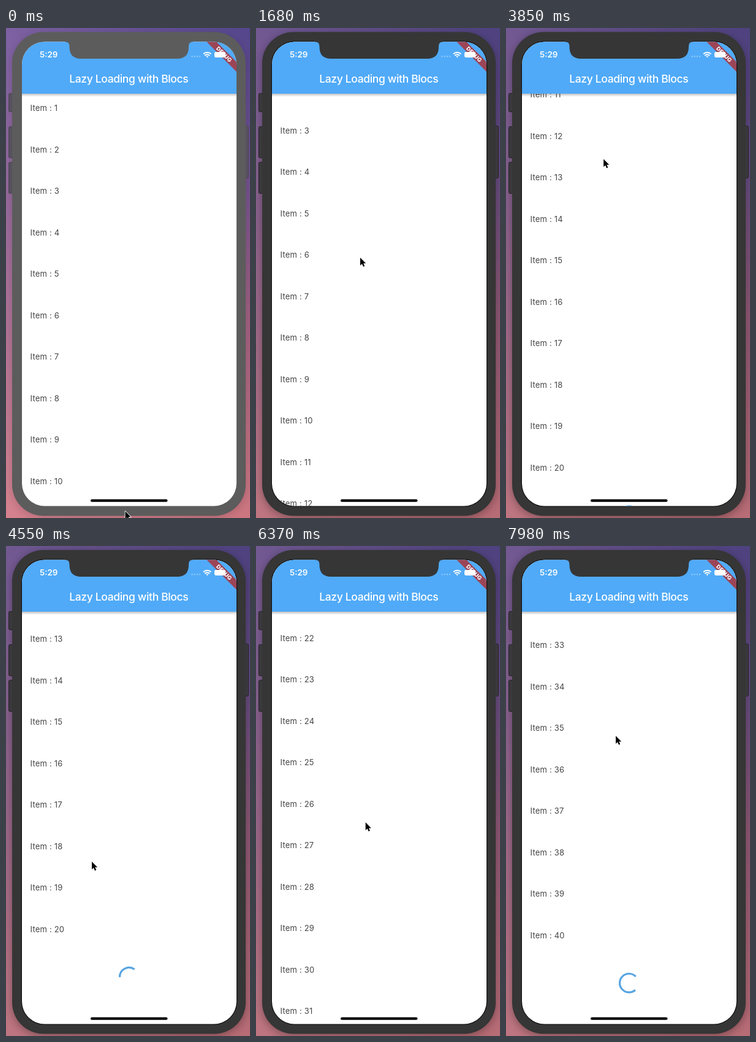
These frames come from a looping animation (398x798 px, 8000 ms). An HTML page:

```html
<!DOCTYPE html>
<html lang="en">
<head>
<meta charset="utf-8">
<title>Lazy list</title>
<style>
  html, body { margin: 0; width: 100%; height: 100%; overflow: hidden; }
  svg { display: block; width: 100vw; height: 100vh; }
  text { font-family: Inter, "Liberation Sans", sans-serif; white-space: pre; }
  #rows text { font-size: 13px; letter-spacing: .2px; fill: #454545; }
</style>
</head>
<body>
<svg viewBox="0 0 398 798" xmlns="http://www.w3.org/2000/svg">
  <defs>
    <linearGradient id="sky" x2="0" y2="1">
      <stop offset="0" stop-color="#7d61a2"/>
      <stop offset=".35" stop-color="#96699b"/>
      <stop offset="1" stop-color="#d5828e"/>
    </linearGradient>
    <linearGradient id="dusk" x2="0" y2="1">
      <stop offset="0" stop-color="#54468c"/>
      <stop offset=".3" stop-color="#6e508c"/>
      <stop offset=".6" stop-color="#a0607f"/>
      <stop offset="1" stop-color="#cd7680"/>
    </linearGradient>
    <linearGradient id="across">
      <stop offset="0" stop-color="#000"/>
      <stop offset="1" stop-color="#fff"/>
    </linearGradient>
    <mask id="toRight"><rect width="398" height="798" fill="url(#across)"/></mask>
    <linearGradient id="barShade" x2="0" y2="1">
      <stop offset="0" stop-color="#000" stop-opacity=".24"/>
      <stop offset="1" stop-color="#000" stop-opacity="0"/>
    </linearGradient>
    <filter id="blur" x="-20%" y="-20%" width="140%" height="140%"><feGaussianBlur stdDeviation="7"/></filter>
    <clipPath id="screen"><rect x="26" y="22.5" width="350" height="756" rx="37"/></clipPath>
  </defs>

  <rect width="398" height="798" fill="url(#sky)"/>
  <rect width="398" height="798" fill="url(#dusk)" mask="url(#toRight)"/>
  <rect id="dim" width="398" height="798" fill="#222"/>
  <rect id="shadow" x="10" y="10" width="381" height="788" rx="50" filter="url(#blur)"/>

  <g id="buttons" stroke-width="1">
    <rect x="4.5" y="106.5" width="9" height="30" rx="2"/>
    <rect x="4.5" y="160.5" width="9" height="51" rx="2"/>
    <rect x="4.5" y="218.5" width="9" height="51" rx="2"/>
    <rect x="387" y="159.5" width="8.5" height="85" rx="2"/>
  </g>
  <rect id="body" x="10" y="6.5" width="381" height="788" rx="51"/>
  <rect id="rim" x="25.5" y="22" width="351" height="757" rx="37.5" fill="none" stroke="#111" stroke-width="1.4"/>

  <g clip-path="url(#screen)">
    <rect x="26" y="22" width="350" height="757" fill="#fff"/>
    <g id="rows"></g>
    <path id="spinner" fill="none" stroke="#58a5e2" stroke-width="3.2"/>
    <rect x="26" y="107" width="350" height="5" fill="url(#barShade)"/>
    <rect x="26" y="22" width="350" height="85" fill="#50aaf8"/>
    <text x="200.3" y="89.4" text-anchor="middle" font-size="17.5" font-weight="500" letter-spacing="-.35" fill="#fff">Lazy Loading with Blocs</text>

    <rect transform="translate(376 22.5) rotate(45)" x="-45" y="23.2" width="90" height="11.2" fill="#9c4556"/>
    <text x="55" y="48.3" font-size="13.4" font-weight="600" fill="#fff">5:29</text>
    <path d="M303.5 46.3h13" stroke="#fff" stroke-width="2.4" stroke-linecap="round" stroke-dasharray="0 4.2" opacity=".38"/>
    <g fill="none" stroke="#fff" stroke-width="2">
      <path d="M322 42.4a8.6 8.6 0 0 1 12.4 0M324.3 45a5.4 5.4 0 0 1 7.8 0"/>
      <path d="M326.3 46.3a2.8 2.8 0 0 1 3.8 0L328.2 48.2Z" fill="#fff" stroke="none"/>
    </g>
    <rect x="340" y="39" width="18" height="9" rx="2.4" fill="#fff"/>
    <text transform="translate(376 22.5) rotate(45)" y="32" text-anchor="middle" font-size="9" font-weight="800" fill="#fff">DEBUG</text>
    <rect x="138" y="767.5" width="125.5" height="4.3" rx="2.1"/>
  </g>
  <path id="notch" d="M96 21H305V22.5Q298 22.5 298 29.5V31Q298 50 279 50H122.5Q103.5 50 103.5 31V29.5Q103.5 22.5 96 22.5Z"/>

  <g id="pointer">
    <circle id="touch" r="21.6" fill="none" stroke="#000" stroke-width="1.4"/>
    <path d="M0 0V12.8L2.9 10.1L5 14.7L7.2 13.7L5.2 9.3H9.2Z" stroke="#fff" stroke-width="1.7" stroke-linejoin="round" paint-order="stroke"/>
  </g>
</svg>
<script>
  const LOOP = 8000, STEP = 70, ROW = 67.5, PAGE = 20;
  const LOADED_AT = 5110, SPIN_STARTS = [3380, 7530], SPIN_CYCLE = 1000;
  const TRAVEL = 720, SLOP = 25, GLIDE = 250;
  const $ = id => document.getElementById(id);

  // Each swipe drags the list, then lets it glide to rest; bounce > 0 overshoots the end
  const swipes = [
    { press: 800, release: 1260, from: [180, 390], to: [176.6, 281], rest: 102, bounce: 0 },
    { press: 2170, release: 2560, from: [166, 430], to: [168, 260], rest: 450, bounce: 0 },
    { press: 3480, release: 3760, from: [165.5, 392], to: [160, 200], rest: 779.5, bounce: .75 },
    { press: 5250, release: 5850, from: [140, 514], to: [186, 235.5], rest: 1450, bounce: 0 },
    { press: 7200, release: 7480, from: [177, 500], to: [185, 240], rest: 2129, bounce: .5 }
  ];
  const entry = [194.5, 787], exit = [177.3, 329];

  const clamp = x => Math.min(1, Math.max(0, x));
  const smooth = x => x * x * (3 - 2 * x);
  const mix = (a, b, u) => a.map((v, i) => v + (b[i] - v) * u);

  const dragPoint = (s, t) => mix(s.from, s.to, clamp((t - s.press) / (s.release - s.press)) ** 1.5);

  function pointerAt(t) {
    const next = swipes.findIndex(s => t < s.release);
    const s = swipes[next], last = swipes[next < 0 ? swipes.length - 1 : next - 1];
    if (s && t >= s.press) return dragPoint(s, t);
    const left = last ? last.release : 0;
    return mix(last ? last.to : entry, s ? s.from : exit, smooth(clamp((t - left) / TRAVEL)));
  }

  function offsetAt(t) {
    let offset = 0;
    for (const s of swipes) {
      if (t < s.press) break;
      offset += Math.max(0, s.from[1] - dragPoint(s, t)[1] - SLOP);
      if (t < s.release) break;
      const next = swipes[swipes.indexOf(s) + 1];
      if (next && t >= next.press) { offset = s.rest; continue; }
      const g = (t - s.release) / GLIDE;
      offset = s.rest - (s.rest - offset) * (1 - s.bounce * g) * Math.exp(-g);
    }
    return offset;
  }

  // cubic-bezier(.4, 0, .2, 1)
  function fastOutSlowIn(x) {
    let lo = 0, hi = 1;
    for (let k = 0; k < 20; k++) {
      const s = (lo + hi) / 2, r = 1 - s;
      if (1.2 * r * r * s + .6 * r * s * s + s ** 3 < clamp(x)) lo = s; else hi = s;
    }
    return smooth(lo);
  }

  function spinnerPath(cy, elapsed) {
    const cycles = Math.max(0, elapsed) / SPIN_CYCLE, step = Math.floor(cycles), u = cycles - step;
    const head = fastOutSlowIn(u * 2), tail = fastOutSlowIn(u * 2 - 1);
    const start = Math.PI * (-.5 + 1.5 * tail + 1.7 * u - .8 * step);
    const sweep = Math.max(1.5 * Math.PI * (head - tail), .01);
    const at = a => `${200.7 + 15.2 * Math.cos(a)} ${cy + 15.2 * Math.sin(a)}`;
    return `M${at(start)}A15.2 15.2 0 ${sweep > Math.PI ? 1 : 0} 1 ${at(start + sweep)}`;
  }

  const rows = Array.from({ length: 12 }, () => {
    const row = document.createElementNS("http://www.w3.org/2000/svg", "text");
    row.setAttribute("x", 39.5);
    return $("rows").appendChild(row);
  });

  function setFocus(on) {
    const shell = on ? "#363636" : "#5c5c5c";
    $("body").setAttribute("fill", shell);
    $("notch").setAttribute("fill", shell);
    $("buttons").setAttribute("fill", on ? "#3a383d" : "#57505f");
    $("buttons").setAttribute("stroke", on ? "#252329" : "#4d4656");
    $("rim").setAttribute("opacity", on ? 1 : 0);
    $("dim").setAttribute("opacity", on ? .12 : 0);
    $("shadow").setAttribute("opacity", on ? .3 : .14);
  }

  function draw(t) {
    const offset = offsetAt(t);
    const page = t < LOADED_AT ? 0 : 1, count = PAGE * (page + 1);
    const first = Math.max(1, Math.floor(offset / ROW));
    const rowY = n => 130.5 + ROW * (n - 1) - offset;

    rows.forEach((row, i) => {
      const n = first + i;
      row.textContent = n <= count ? `Item : ${n}` : "";
      row.setAttribute("y", rowY(n) + 4.7);
    });
    $("spinner").setAttribute("d", spinnerPath(rowY(count) + 77.7, t - SPIN_STARTS[page]));

    setFocus(t >= swipes[0].press);
    $("pointer").setAttribute("transform", `translate(${pointerAt(t)})`);
    const touching = swipes.some(s => t >= s.press && t < s.release);
    $("touch").setAttribute("visibility", touching ? "visible" : "hidden");
  }

  const begin = performance.now();
  function tick() {
    const t = (performance.now() - begin) % LOOP;
    draw(Math.floor(t / STEP) * STEP);
    requestAnimationFrame(tick);
  }
  tick();
</script>
</body>
</html>
```
